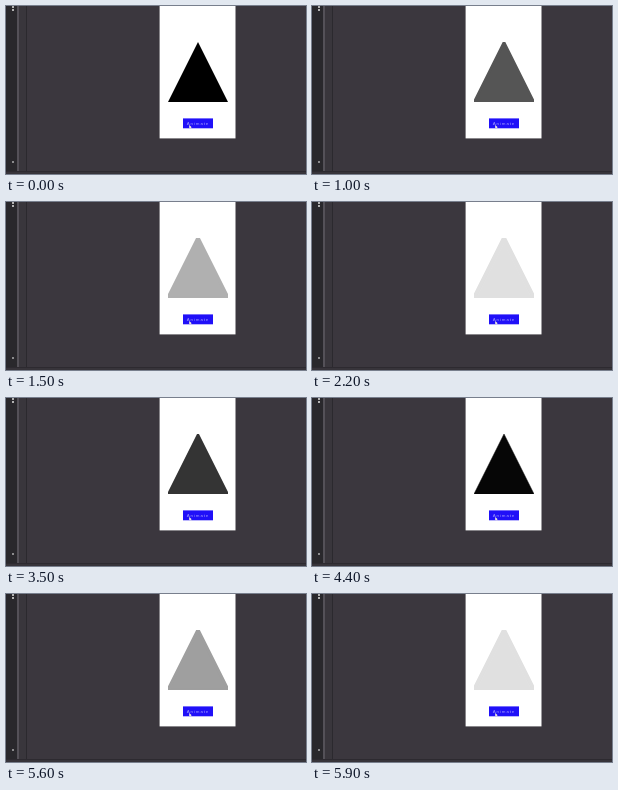
An HTML page that plays this animation: 300x168 px, repeating every 6 s.

```html
<!DOCTYPE html>
<html lang="en">
<head>
<meta charset="utf-8">
<title>Fading triangle</title>
<style>
  html, body { margin: 0; width: 100%; height: 100%; overflow: hidden; background: #3b373e; }
  svg { display: block; width: 100%; height: 100%; }
  text { font-family: "Liberation Sans", Arial, sans-serif; }
</style>
</head>
<body>
<svg viewBox="0 0 300 168">
  <defs>
    <clipPath id="box"><rect x="162" y="36" width="60" height="60"/></clipPath>
  </defs>

  <!-- editor frame -->
  <rect width="300" height="168" fill="#3b373e"/>
  <rect width="11" height="168" fill="#29282c"/>
  <rect x="11" width="2" height="168" fill="#545158"/>
  <rect x="13" width="7" height="168" fill="#39363c"/>
  <rect x="20" width="1" height="168" fill="#2b292e"/>
  <rect y="165" width="300" height="1" fill="#2d2a30"/>
  <rect y="166" width="300" height="2" fill="#37343a"/>
  <g fill="#b4b4b4">
    <rect x="6" width="2" height="2"/>
    <rect x="6" y="3" width="2" height="2"/>
    <rect x="6" y="155" width="2" height="2" fill="#8c8c8e"/>
  </g>

  <!-- page preview -->
  <rect x="153.6" width="75.9" height="132.4" fill="#fff"/>
  <g clip-path="url(#box)">
    <path id="tri" d="M192 36L222 96H162Z" stroke-linejoin="round"/>
  </g>
  <rect x="177" y="112.4" width="30" height="9.9" fill="#2010f8"/>
  <text x="192" y="119.3" font-size="4.4" fill="#fff" fill-opacity=".6" text-anchor="middle" letter-spacing=".9">Animate</text>
  <path d="M183.2 119v3.4l.8-.7 1 1 .6-.6-.9-.9h1Z" fill="#f4f0d8"/>
</svg>
<script>
  const LOOP = 6000, FALL = 1720, FLOOR = 0.12;
  const tri = document.getElementById('tri');
  const ramp = (t, from, to) => Math.min(1, Math.max(0, (t - from) / (to - from)));

  // 0 = solid black, 1 = palest
  function phase(t) {
    if (t < 2650) return ramp(t, 0, FALL);
    if (t < 4180) return 1 - ramp(t, 2650, 4180);
    return ramp(t, 4180, 4180 + FALL);
  }

  function draw(t) {
    const x = phase(t);
    const alpha = 1 - (1 - FLOOR) * Math.pow(x, 1.8);
    const grey = Math.round(255 * (1 - alpha));
    const paint = `rgb(${grey},${grey},${grey})`;
    tri.setAttribute('fill', paint);
    tri.setAttribute('stroke', paint);
    tri.setAttribute('stroke-width', (4 * x).toFixed(3));
  }

  const start = performance.now();
  function tick() {
    draw((performance.now() - start) % LOOP);
    requestAnimationFrame(tick);
  }
  draw(0);
  requestAnimationFrame(tick);
</script>
</body>
</html>
```
